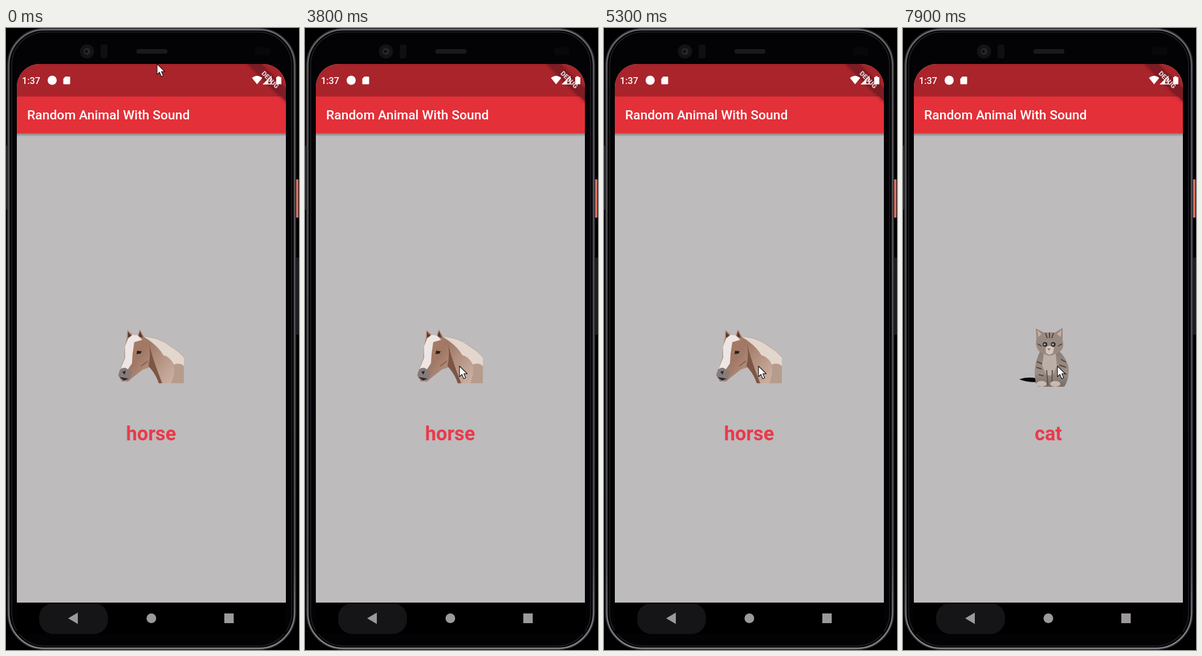
Recreate the animation shown at these times as an HTML page. Size 514 px wide and 1089 px high, loop 8000 ms.

```html
<!DOCTYPE html>
<html lang="en">
<head>
<meta charset="utf-8">
<title>Random Animal With Sound</title>
<style>
  html, body { margin: 0; width: 100%; height: 100%; overflow: hidden; background: #000; }
  svg { display: block; width: 100%; height: 100%; }
  text { font-family: Roboto, sans-serif; }
</style>
</head>
<body>
<svg viewBox="0 0 514 1089">
  <defs>
    <clipPath id="screen"><path d="M19 103a40 40 0 0 1 40-40H451a40 40 0 0 1 40 40V1061H19z"/></clipPath>
    <clipPath id="galleryArea"><path d="M19 63H491V951H19z"/></clipPath>
    <linearGradient id="rim" x2="0" y2="1">
      <stop offset="0" stop-color="#6c6c70"/><stop offset=".1" stop-color="#59595d"/>
      <stop offset=".85" stop-color="#505054"/><stop offset="1" stop-color="#88888c"/>
    </linearGradient>
    <linearGradient id="barShadow" x2="0" y2="1">
      <stop stop-color="#000" stop-opacity=".42"/><stop offset="1" stop-color="#000" stop-opacity="0"/>
    </linearGradient>
    <linearGradient id="galleryBody" x2="0" y2="1">
      <stop stop-color="#262121"/><stop offset=".7" stop-color="#221d20"/><stop offset="1" stop-color="#1a161c"/>
    </linearGradient>
    <linearGradient id="pinkBar" x2="0" y2="1">
      <stop stop-color="#eaa9d2"/><stop offset="1" stop-color="#e3a0c6"/>
    </linearGradient>
    <linearGradient id="coat" x2="1" y2=".6">
      <stop stop-color="#ad8069"/><stop offset=".45" stop-color="#a17865"/><stop offset="1" stop-color="#c9aea0"/>
    </linearGradient>
    <linearGradient id="fur" x2="0" y2="1">
      <stop stop-color="#8c7e76"/><stop offset=".6" stop-color="#9c8f88"/><stop offset="1" stop-color="#776b65"/>
    </linearGradient>
    <filter id="soft" x="-30%" y="-100%" width="160%" height="300%"><feGaussianBlur stdDeviation="3"/></filter>
  </defs>

  <!-- phone body -->
  <rect width="514" height="1089"/>
  <path d="M0 206h2v112h-2z" fill="#242427"/>
  <rect x="507" y="265" width="6" height="67" rx="1" fill="#d76f60"/>
  <rect x="507" y="402" width="7" height="135" rx="1" fill="#1d1d20"/>
  <rect x="3" y="1" width="505" height="1087" rx="64" fill="#0c0c0e" stroke="#2c2c30" stroke-width="2"/>
  <rect x="5" y="3" width="501" height="1083" rx="62" fill="#030305" stroke="url(#rim)" stroke-width="2.500"/>
  <rect x="10" y="7" width="491" height="1075" rx="58" fill="#030305" stroke="#232327" stroke-width="1.500"/>
  <circle cx="142" cy="41" r="12.500" fill="#131315"/>
  <circle cx="142" cy="41" r="6" fill="#26272b"/>
  <circle cx="141" cy="41" r="2.500" fill="#0a0a0e"/>
  <rect x="166" y="29" width="12" height="24" rx="3" fill="#0f0f11"/>
  <rect x="229" y="37" width="54" height="8" rx="3" fill="#1b191a"/>
  <rect x="437" y="34" width="26" height="14" rx="2" fill="#080809"/>

  <g clip-path="url(#screen)">
    <g id="app">
      <path d="M19 63H491V1006H19z" fill="#bdbbbc"/>
      <path d="M19 183H491V190H19z" fill="url(#barShadow)"/>
      <path d="M19 120H491V184H19z" fill="#e43038"/>
      <path d="M19 63H491V120H19z" fill="#aa242b"/>
      <text x="37" y="160" font-size="22.900" font-weight="500" fill="#fff">Random Animal With Sound</text>

      <g transform="translate(491 63) rotate(45)">
        <rect x="-50" y="32" width="100" height="13.800" filter="url(#soft)" opacity=".5"/>
        <rect x="-50" y="32" width="100" height="13.800" fill="#7d1c24"/>
        <text y="43" text-anchor="middle" font-size="11.700" font-weight="900" fill="#e3cbce">DEBUG</text>
      </g>

      <g id="horse">
        <path d="M212 543L213 529 222 537 231 538 235 528 242 541Q261 540 278 550L301 565 312 576V622H268Q264 607 252 594L240 598 222 612 214 619 203 618 197 608 200 599 208 577 209 557Z" fill="url(#coat)"/>
        <path d="M242 541Q262 541 279 551L301 566 312 577V592Q303 582 298 596 289 575 276 573 267 556 242 541Z" fill="#e3d6cd"/>
        <path d="M250 548Q255 574 274 622H268Q263 606 250 592 255 570 250 548Z" fill="#7d5544"/>
        <path d="M294 590Q297 605 290 622H312V592Q301 584 294 590Z" fill="#b69c8d"/>
        <path d="M214 544L222 537 231 538 239 546 225 550 222 571 221 587 213 599 201 597 209 577 209 557Z" fill="#ede6e4"/>
        <path d="M214 542V532L220 539ZM233 540L235 531 240 542Z" fill="#59372c"/>
        <path d="M200 598Q207 592 213 597L221 602 217 615 204 619 197 608Z" fill="#877c7c"/>
        <path d="M204 602l6-2-2 7zM199 611l16 3-8 3z" fill="#292327"/>
        <path d="M230 565l8 1-2 4-7 1z" fill="#29201e"/>
        <path d="M237 592l12-9" stroke="#7c5442" stroke-width="1.500"/>
        <text x="254.500" y="722" text-anchor="middle" font-size="34.400" font-weight="700" fill="#e93a4b">horse</text>
      </g>

      <g id="cat">
        <path d="M204 615Q217 610 233 613V620Q215 620 204 615Z" fill="#080708"/>
        <path d="M240 567Q227 593 233 622L238 628H283Q293 612 290 592 285 576 275 567Z" fill="url(#fur)"/>
        <path d="M234 544L233 526 247 533H267L280 525 280 547Q284 559 275 567 257 579 240 567 231 559 234 544Z" fill="#988a80"/>
        <path d="M236 529l7 7-6 5zM278 529l-8 7 7 5z" fill="#cfaaa2"/>
        <path d="M247 570Q257 577 268 570L270 592 262 608H252L244 591Z" fill="#bcafa8"/>
        <path d="M250 534l3 9M257 533v10M264 534l-3 9M236 553l7 4M279 553l-7 4M235 584l9 4M234 594l9 3M277 580l9 5M274 590l12 4M279 604l8 2M238 607l9 2" stroke="#514842" stroke-width="2" fill="none"/>
        <path d="M250 560Q257 553 265 560L263 569 257 572 251 569Z" fill="#d3c6bd"/>
        <g fill="#262522"><circle cx="249" cy="554" r="4"/><circle cx="263.500" cy="554" r="4"/></g>
        <g fill="#9ca7a0"><circle cx="248.500" cy="554" r="2"/><circle cx="263" cy="554" r="2"/></g>
        <path d="M253 561h6l-3 4z" fill="#a66c61"/>
        <path d="M252 599l2 26M262 599l-1 26" stroke="#5d524c" stroke-width="2"/>
        <g fill="#c7bab2"><ellipse cx="243" cy="623" rx="9" ry="5"/><ellipse cx="267" cy="623" rx="9" ry="5"/></g>
        <text x="255" y="722" text-anchor="middle" font-size="34.400" font-weight="700" fill="#e93a4b">cat</text>
      </g>

      <path d="M19 1006H491V1061H19z"/>
      <rect x="58" y="1007" width="121" height="54" rx="25" fill="#151416"/>
      <g fill="#9c9a99">
        <path d="M109 1033.500L126 1023.500V1043.500Z"/>
        <circle cx="255" cy="1033.500" r="8.500"/>
        <path d="M383 1025h16.500v17H383z"/>
      </g>
    </g>

    <g id="gallery">
      <path d="M19 63H491V1061H19z"/>
      <path d="M19 63H491V142.500H19z" fill="url(#pinkBar)"/>
      <path d="M19 142.500H491V199H19z" fill="#402c34"/>
      <path d="M19 199H491V254H19z" fill="#0f0d10"/>
      <path d="M19 254H491V951H19z" fill="url(#galleryBody)"/>
      <g fill="#231f21">
        <circle cx="79" cy="822" r="29"/><circle cx="167" cy="822" r="29"/><circle cx="255" cy="822" r="29"/>
        <circle cx="343" cy="822" r="29"/><circle cx="431" cy="822" r="29"/>
      </g>
      <circle cx="51.500" cy="227" r="19" fill="#71839f"/>
      <text x="99" y="235" font-size="20.500" fill="#bdbbbd">Albums</text>
      <path d="M211 247L224 234V247Z" fill="#777577"/>
      <path d="M381 219h6v-3h5v3h16v18h-27z" fill="#cac8ca"/>
      <circle cx="394.500" cy="228" r="5.500" fill="#cac8ca" stroke="#0f0d10" stroke-width="2.500"/>
      <path d="M456 216h6v6h-6zM456 224h6v6h-6zM456 232h6v6h-6z" fill="#777577"/>
      <g clip-path="url(#galleryArea)">
        <rect x="131" y="922" width="248" height="58" rx="25" fill="#858385"/>
        <text x="253" y="956" text-anchor="middle" font-size="16.200" fill="#161416">0 images/videos available</text>
      </g>
    </g>

    <!-- status icons -->
    <g fill="#fff">
      <text id="clock" x="28" y="97.500" font-size="16.300" font-weight="500"></text>
      <circle cx="81" cy="91.500" r="8"/>
      <path d="M104 85h7q1.500 0 1.500 1.500V97q0 1.500-1.500 1.500h-9q-1.500 0-1.500-1.500V89z"/>
      <path d="M431.500 87.500Q440.500 80 449.500 87.500L440.500 98.500Z"/>
      <path d="M452 98L465 85V98Z" fill="none" stroke="#fff" stroke-width="1.500"/>
      <path d="M451 98.500L460 89.500V98.500Z"/>
      <path d="M476 84.500h4v1.500h3V98.500h-9V86h2z"/>
    </g>
  </g>

  <path id="cursor" d="M0 0V18.500L4.300 14.500 7.400 22 10.800 20.500 7.700 13.300H13.500Z" fill="#fff" stroke="#19191b" stroke-width="1.200" stroke-linejoin="round"/>
</svg>
<script>
const LOOP = 8000;
const CAT_TIME = 6800;
const GALLERY_START = 4000, GALLERY_END = 4200;

// Cursor stops: time, x, y
const stops = [
  [0, 265, 63], [200, 265, 63], [600, 276, 42], [1900, 276, 42],
  [2600, 281, 620], [2900, 281, 620], [3300, 271, 592], [LOOP, 271, 592]
];
const $ = id => document.getElementById(id);
const show = (id, visible) => $(id).style.display = visible ? "" : "none";
const ease = p => p * p * (3 - 2 * p);

function cursorAt(time) {
  const next = stops.findIndex(stop => stop[0] > time);
  const [start, x0, y0] = stops[next - 1];
  const [end, x1, y1] = stops[next];
  const p = ease((time - start) / (end - start));
  return [x0 + (x1 - x0) * p, y0 + (y1 - y0) * p];
}

function draw(time) {
  const inGallery = time >= GALLERY_START && time < GALLERY_END;
  show("app", !inGallery);
  show("gallery", inGallery);
  show("horse", time < CAT_TIME);
  show("cat", time >= CAT_TIME);
  $("clock").textContent = inGallery ? "1:28" : "1:37";
  $("cursor").setAttribute("transform", `translate(${cursorAt(time)})`);
}

const origin = performance.now();
function tick() {
  const elapsed = performance.now() - origin;
  draw(Math.floor(elapsed / 100) * 100 % LOOP);
  requestAnimationFrame(tick);
}
tick();
</script>
</body>
</html>
```
